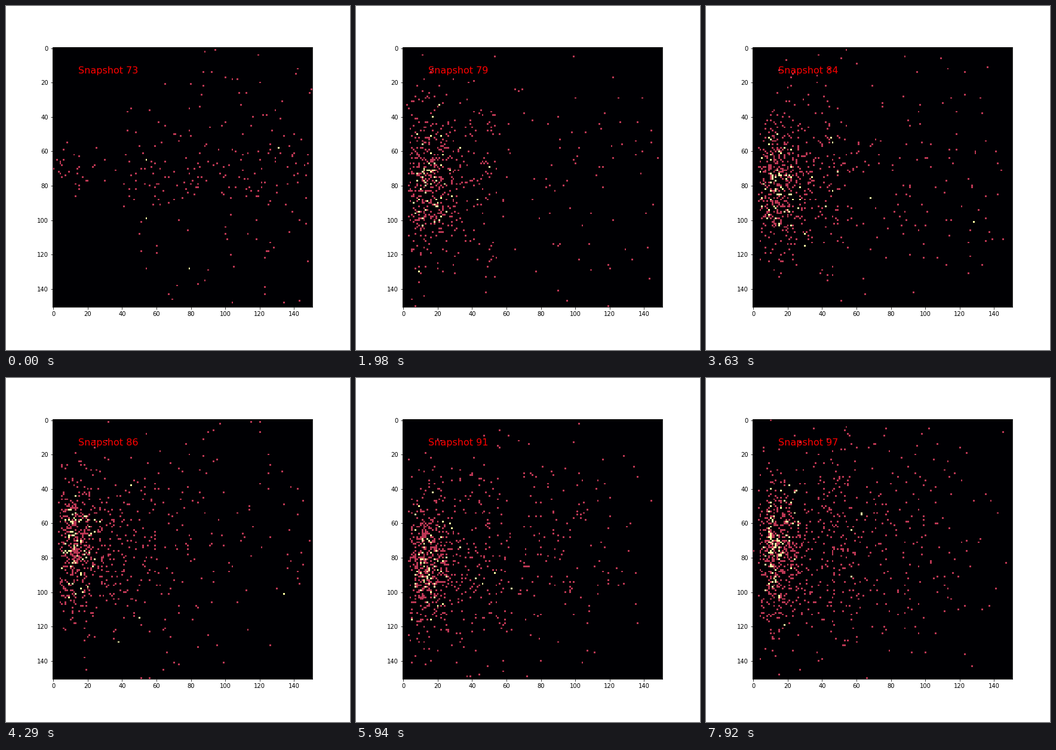
Recreate the animation shown at these times as a matplotlib script. Size 576 by 576 pixels, loop 8000 ms.

```python
import numpy as np
import matplotlib.pyplot as plt
from matplotlib.animation import FuncAnimation

CELLS = 151
FIRST, LAST = 73, 97
HOLD = 330          # ms each snapshot stays
STEP, LOOP = 40, 8000


def ease(p):
    p = min(max(p, 0), 1)
    return p * p * (3 - 2 * p)


def density(snap):
    """Particle counts per cell for one snapshot, clipped to two."""
    rng = np.random.default_rng(1000 + snap)
    age = (snap - FIRST) / (LAST - FIRST)
    gathered = ease((snap - FIRST) / 4)   # the cloud condenses at the left
    loose = 1 - gathered
    sway = np.sin(2 * np.pi * (snap - 79.7) / 9)

    core = int(gathered * (240 + 230 * age))
    shell = int(gathered * (290 - 20 * age))
    haze = int(loose * 165 + gathered * (30 + 260 * age))
    band = int(loose * 110)

    x = np.concatenate([
        rng.gamma(5.5, 2.8, core),
        3 + 62 * rng.beta(1.2, 1.9, shell),
        38 + 113 * rng.beta(1.2, 1 + 1.2 * age, haze),
        rng.uniform(0, CELLS, band),
    ])
    y = np.concatenate([
        rng.normal(79 + 6 * sway, 19, core),
        rng.normal(78 + 4 * sway, 28, shell),
        rng.normal(72, 37 + 18 * loose, haze),
        rng.normal(73, 9, band),
    ])
    grid, _, _ = np.histogram2d(y, x, bins=CELLS, range=[[0, CELLS]] * 2)
    return np.minimum(grid, 2)


snapshots = {s: density(s) for s in range(FIRST, LAST + 1)}

fig = plt.figure(figsize=(8, 8), dpi=72, facecolor="white")
ax = fig.add_axes([0.135, 0.125, 0.755, 0.755])
image = ax.imshow(snapshots[FIRST], cmap="inferno", vmin=0, vmax=2,
                  interpolation="nearest")
label = ax.text(0.1, 0.9, "", color="red", fontsize=16,
                family="DejaVu Sans", transform=ax.transAxes)


def update(i):
    # change on the drawn frame nearest to the true moment
    snap = min(FIRST + (i * STEP + 30) // HOLD, LAST)
    image.set_data(snapshots[snap])
    label.set_text(f"Snapshot {snap}")
    return image, label


anim = FuncAnimation(fig, update, frames=LOOP // STEP, interval=STEP,
                     init_func=lambda: update(0), repeat=True,
                     repeat_delay=0, blit=False)
plt.show()
```
